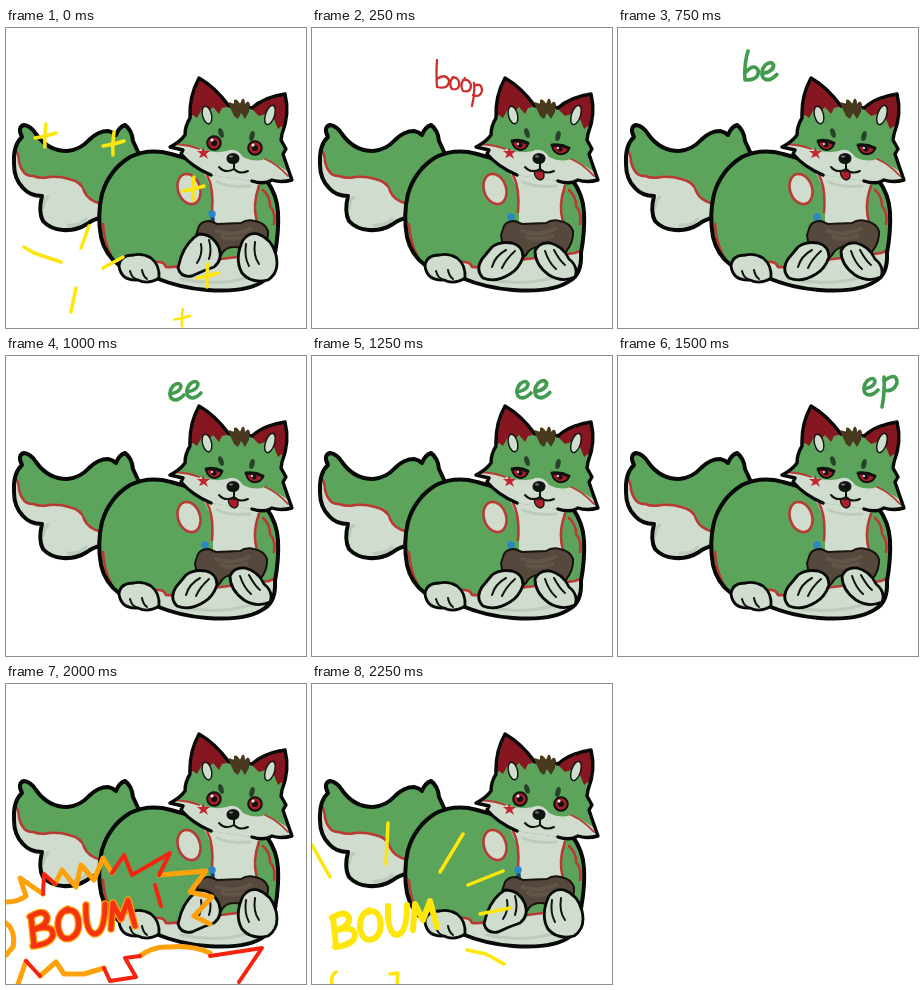
An HTML page for the animation above (2500 ms loop, 300 px wide and 300 px high).

```html
<!DOCTYPE html>
<html lang="en">
<head>
<meta charset="utf-8">
<title>Fox with a gamepad</title>
<style>
html, body { margin: 0; width: 100%; height: 100%; overflow: hidden; background: #fff; }
svg { display: block; width: 100%; height: 100%; }
path, ellipse, circle { stroke-linecap: round; stroke-linejoin: round; }
.ink { stroke: #080a08; stroke-width: 4; }
.paw { fill: #d0ddce; stroke: #080a08; stroke-width: 2.8; }
.thin { stroke: #10130f; stroke-width: 2; }
.none { fill: none; }
.green { fill: #5ca45b; }
.cream { fill: #d0ddce; }
.seam { stroke: #b93a35; stroke-width: 2.6; }
.dark { fill: #10130f; }
.red { fill: #a91f29; }
.shade { fill: none; stroke: #bccbbb; stroke-width: 3; }
.word { fill: none; stroke-width: 2.3; stroke: #cb302c; }
.leaf { stroke: #429b4e; stroke-width: 3.6; }
.flash { fill: none; stroke: #ffe60a; stroke-width: 3.5; }

/* ten slots of 250 ms */
.slot, .idle, .play, .press, .lift { animation: slot 2500ms steps(1, end) infinite; }
.slot { animation-delay: calc(var(--n) * 250ms - 2500ms); }
.idle { animation-name: idle; }
.press { animation-name: press; }
.play { animation-name: play; }
.lift { animation-name: lift; }
@keyframes slot { 0% { visibility: visible } 10%, 100% { visibility: hidden } }
@keyframes idle { 0% { visibility: visible } 10% { visibility: hidden } 80%, 100% { visibility: visible } }
@keyframes press { 0% { visibility: hidden } 10% { visibility: visible } 80%, 100% { visibility: hidden } }
@keyframes play { 0% { visibility: hidden } 10% { visibility: visible } 20% { visibility: hidden } 30% { visibility: visible } 80%, 100% { visibility: hidden } }
@keyframes lift { 0% { transform: none } 40% { transform: translate(1px, -3px) } 50% { transform: none } 60% { transform: translate(1px, -3px) } 70%, 100% { transform: none } }
</style>
</head>
<body>
<svg viewBox="0 0 300 300" role="img" aria-label="A round green fox playing with a gamepad">
<defs>
  <path id="star" d="M1-12Q-1 0 0 11M-10 2Q0 1 11-3"/>
  <g id="pad">
    <path d="M6 7Q9 2 17 2L24 5L48 4Q54 0 62 2Q72 4 75 12Q76 22 68 33Q60 42 53 35Q48 27 41 28Q32 28 28 36Q21 44 13 37Q4 28 3 16Z" fill="#56483c" stroke="#17130f" stroke-width="2"/>
    <path class="none" d="M24 12Q38 18 57 10M29 18Q40 22 54 17" stroke="#6d5d50" stroke-width="4" opacity=".6"/>
  </g>
  <g id="stick">
    <path d="M1 8L0 0" stroke="#16425e" stroke-width="4"/>
    <circle r="3.7" fill="#2987c5"/>
  </g>
  <path id="boum" d="M25 232L28 261M24 233Q38 224 41 233Q42 241 29 245Q47 240 47 251Q45 260 27 262M62 225Q51 229 52 243Q55 258 65 254Q75 249 72 234Q69 224 60 227M80 221Q79 247 88 250Q99 250 99 220M105 245L107 219L115 235L122 216L129 242"/>
  <path id="boop" d="M205 12Q204 26 205 39Q217 42 217 32Q213 25 205 31M221 29Q216 35 220 41Q228 43 227 34Q225 28 220 30M233 30Q227 36 231 43Q239 45 239 37Q237 31 232 32M242 35Q243 46 240 58M242 38Q250 34 250 43Q248 50 241 47"/>
  <path id="e" d="M1 11Q12 9 12 3Q10-2 4 3Q-1 9 2 15Q7 20 15 12"/>
  <path id="tail" d="M18 97Q25 98 30 106Q42 123 61 123Q74 122 83 112Q92 103 102 103Q107 104 110 107Q113 99 119 97Q126 102 127 113L133 126L112 178L96 189Q86 192 81 196Q70 203 57 202Q44 201 37 193Q32 184 36 168Q24 168 17 160Q8 151 8 136Q7 117 16 109Q11 99 18 97Z"/>
  <path id="body" d="M165 126Q143 120 124 129Q103 142 96 166Q91 187 95 209Q99 227 114 238L150 250Q174 260 201 262Q242 265 259 252Q270 245 269 225Q273 203 272 184Q271 167 261 153Z"/>
  <path id="head" d="M205 147Q186 139 175 126L177 122L164 119Q174 114 179 107Q179 98 184 90Q183 68 193 50Q209 59 223 78Q234 75 246 80Q258 69 279 66Q284 86 276 106L275 112L280 121L277 126Q281 138 286 152Q275 155 266 152Q258 157 246 153"/>
  <clipPath id="tailClip"><use href="#tail"/></clipPath>
  <clipPath id="bodyClip"><use href="#body"/></clipPath>
  <clipPath id="headClip"><use href="#head"/></clipPath>
</defs>

<g id="tailPart">
  <use href="#tail" class="green"/>
  <path clip-path="url(#tailClip)" class="cream seam" d="M5 117Q13 123 13 134Q17 149 27 148Q35 151 43 149Q53 148 63 151Q76 154 78 163Q82 173 96 176L100 210H0V120Z"/>
  <path class="shade" d="M37 180Q38 172 42 169M62 197Q73 198 80 191"/>
  <use href="#tail" class="none ink"/>
</g>

<g id="bodyPart">
  <use href="#body" class="green"/>
  <g clip-path="url(#bodyClip)">
    <path class="cream seam" d="M150 234Q158 233 160 239Q170 240 183 235L263 225Q272 222 276 216V270H145Z"/>
    <path class="cream" d="M194 138Q206 157 207 174L207 202H251Q247 178 253 150Z"/>
    <path class="none seam" d="M201 147Q208 160 206 184M253 158Q246 177 251 194M257 162Q264 168 264 178Q270 185 268 196M97 196Q98 214 105 227"/>
    <path class="shade" d="M211 154Q224 160 244 158M175 251Q214 260 254 246"/>
  </g>
  <ellipse class="cream seam" cx="183" cy="161" rx="11" ry="15.5" transform="rotate(-18 183 161)"/>
  <use href="#body" class="none ink"/>
  <path class="paw" d="M113 238Q114 227 128 227Q136 225 145 230Q154 237 153 250Q142 257 132 252Q115 253 113 238Z"/>
  <path class="none thin" d="M124 243Q126 250 130 251M136 242Q137 248 141 251"/>
</g>

<g id="headPart">
  <use href="#head" class="green"/>
  <g clip-path="url(#headClip)">
    <path fill="#86161f" d="M180 92V45H205L226 78L216 80L213 86L207 79L203 83L196 81L191 90L187 87ZM243 78L270 60L290 62L283 108L276 98L272 101L268 91L262 93L259 86L253 88Z"/>
    <path class="cream" d="M160 114Q183 116 194 121Q208 126 221 123Q230 119 237 129Q249 135 259 131Q273 137 291 150V165H185Z"/>
    <path class="none" d="M168 116Q184 117 193 121M259 131Q271 136 282 148" stroke="#b93a35" stroke-width="1.8"/>
  </g>
  <use href="#head" class="none ink" style="stroke-width:3.4"/>
  <path fill="#49391f" d="M228 88L222 75Q224 73 228 77L228 72Q231 70 234 76L236 71Q239 70 239 76Q242 71 244 76L243 84L239 91L235 85L232 91Z"/>
  <ellipse class="cream thin" style="stroke-width:1.4" cx="201" cy="87" rx="4.5" ry="9" transform="rotate(-14 201 87)"/>
  <ellipse class="cream thin" style="stroke-width:1.4" cx="264" cy="87" rx="4.5" ry="10" transform="rotate(18 264 87)"/>
  <ellipse cx="215" cy="105" rx="2.5" ry="5" transform="rotate(-18 215 105)" fill="#29402a"/>
  <ellipse cx="246" cy="108" rx="2.5" ry="5" transform="rotate(15 246 108)" fill="#29402a"/>
  <path fill="#c32630" d="M197 119L199 123L204 123L200 126L202 131L198 128L193 130L195 126L191 123L196 123Z"/>
  <ellipse class="dark" cx="227" cy="130.500" rx="6.500" ry="5.500"/>
  <ellipse cx="225" cy="128.500" rx="2" ry="1" fill="#77827b"/>
  <path class="none thin" d="M228 136L228 141Q219 146 213 139M228 141Q234 147 242 143"/>
</g>

<g class="idle">
  <g class="thin red"><circle cx="208" cy="115" r="6.8"/><circle cx="249" cy="120" r="6.8"/></g>
  <circle class="dark" cx="208" cy="115" r="3"/><circle class="dark" cx="249" cy="120" r="3"/>
  <circle cx="206" cy="112" r="1.5" fill="#fff"/><circle cx="247" cy="117" r="1.5" fill="#fff"/>
  <use href="#stick" x="206" y="186"/>
  <use href="#pad" x="187" y="191"/>
  <path class="paw" d="M175 229Q181 213 193 206Q207 206 213 220Q217 232 208 239Q196 243 186 248Q175 250 172 240Z"/>
  <path class="paw" d="M237 212Q243 204 252 206Q266 211 270 227Q274 244 262 252Q245 256 236 245Q228 231 237 212Z"/>
  <path class="none thin" d="M203 212Q206 222 203 231M195 216Q197 226 191 235M240 216Q238 229 243 238M249 214Q247 228 253 236"/>
</g>

<g class="press">
  <path class="red thin" d="M200 114Q208 112 216 116Q214 122 208 122Q202 121 200 114ZM240 118Q249 116 257 121Q254 127 247 126Q242 125 240 118Z"/>
  <path class="none thin" style="stroke-width:3" d="M200 113Q208 111 216 115M240 117Q249 116 257 120"/>
  <circle class="dark" cx="208" cy="117" r="2.5"/><circle class="dark" cx="248" cy="121" r="2.5"/>
  <circle cx="206" cy="116" r="1" fill="#fff"/><circle cx="246" cy="120" r="1" fill="#fff"/>
</g>

<g class="slot" style="--n:2">
  <path class="red thin" style="stroke-width:1.3" d="M222 143Q225 148 231 144L228 141Z"/>
  <use href="#stick" x="190" y="188"/>
  <circle class="red" cx="232" cy="190" r="3"/>
  <use href="#pad" x="176" y="190"/>
  <path class="paw" d="M179 213Q188 204 198 207Q208 212 209 224Q207 239 197 244Q184 254 170 250Q162 243 167 230Z"/>
  <path class="paw" d="M222 212Q230 204 241 207Q252 214 256 229Q262 242 254 249Q240 254 229 244Q218 235 219 221Z"/>
  <path class="none thin" d="M188 214Q178 222 177 232M198 214Q188 223 187 235M230 214Q231 226 239 235M239 212Q242 224 248 231"/>
</g>

<g class="play">
  <path class="red thin" style="stroke-width:1.3" d="M222 143Q223 152 229 152Q234 150 231 143Z"/>
  <use href="#stick" x="199" y="189"/>
  <use href="#pad" x="186" y="191"/>
  <path class="paw" d="M180 219Q188 213 200 215Q211 218 211 229Q207 241 198 246Q184 255 171 250Q163 242 170 231Z"/>
  <g class="lift">
    <path class="paw" d="M223 223Q227 214 238 215Q251 218 257 231Q267 239 263 249Q250 255 237 247Q223 237 223 223Z"/>
    <path class="none thin" d="M233 223Q237 235 244 241M242 222Q248 233 253 237"/>
  </g>
  <path class="none thin" d="M194 222Q183 228 180 239M203 223Q194 231 190 240"/>
</g>

<g class="slot flash" style="--n:0">
  <use href="#star" x="39" y="108"/><use href="#star" x="107" y="116"/>
  <use href="#star" x="187" y="161"/><use href="#star" x="201" y="248"/>
  <use href="#star" transform="translate(176 290) scale(.75)"/>
  <path d="M18 219L28 225L55 234M70 260L65 284M117 229L97 240M83 198L75 220"/>
</g>

<g class="slot word" style="--n:1" aria-label="boop">
  <use href="#boop" x="-80" y="20"/>
</g>
<g class="slot word" style="--n:2" aria-label="boop">
  <use href="#boop"/>
</g>
<g class="slot word leaf" style="--n:3" aria-label="be">
  <path d="M130 23Q126 36 127 52Q142 52 140 42Q136 35 128 44"/>
  <use href="#e" transform="translate(143 34) scale(1.05)"/>
</g>
<g class="slot word leaf" style="--n:4" aria-label="ee">
  <use href="#e" x="163" y="27"/><use href="#e" x="180" y="25"/>
</g>
<g class="slot word leaf" style="--n:5" aria-label="ee">
  <use href="#e" x="204" y="25"/><use href="#e" transform="translate(222 24) scale(1.05)"/>
</g>
<g class="slot word leaf" style="--n:6" aria-label="ep">
  <use href="#e" x="245" y="22"/>
  <path d="M266 21Q267 36 264 51M266 25Q279 15 279 27Q275 37 266 34"/>
</g>
<g class="slot word leaf" style="--n:7;stroke-width:2" aria-label="clic">
  <path d="M250 43Q242 43 244 50Q247 53 252 49M254 38L253 51M259 44L259 51M260 40L260 40M270 43Q262 43 263 50Q266 53 272 49"/>
  <path d="M235 30L242 37M231 45L237 45M234 60L242 54M250 28L252 33M268 35L273 29M277 39L283 34M278 46L284 47M274 53L281 60"/>
</g>

<g class="slot none" style="--n:8" aria-label="BOUM">
  <g stroke="#ffa10a" stroke-width="5">
    <path d="M0 218Q12 218 20 212L14 194L37 210M49 200L56 186L70 203L75 181L88 196L97 174L106 189M153 191L200 187L184 208L206 213L188 232L204 240M12 300L20 277M34 292L50 278L58 290L78 290L98 284M134 272Q146 262 164 263Q186 261 204 269M0 239Q10 247 7 263L0 271"/>
  </g>
  <g stroke="#f5230f" stroke-width="4">
    <path d="M37 210L38 190L49 200M106 189L118 171L126 191L164 169L153 191M20 277L34 292M98 284L104 297L130 293L119 274L134 272M204 272L256 264L233 298M149 201L155 222"/>
  </g>
  <use href="#boum" stroke="#ffa10a" stroke-width="7.5"/>
  <use href="#boum" stroke="#f5330f" stroke-width="5"/>
</g>

<g class="slot flash" style="--n:9" aria-label="BOUM">
  <use href="#boum" x="-4" y="1" stroke-width="6"/>
  <path d="M0 161L18 193M76 139L74 180M151 150L128 188M191 187L156 201M198 224L168 230M155 266L174 270L192 280M24 288Q18 292 20 300M78 290L86 289L85 300"/>
</g>
</svg>
</body>
</html>
```
